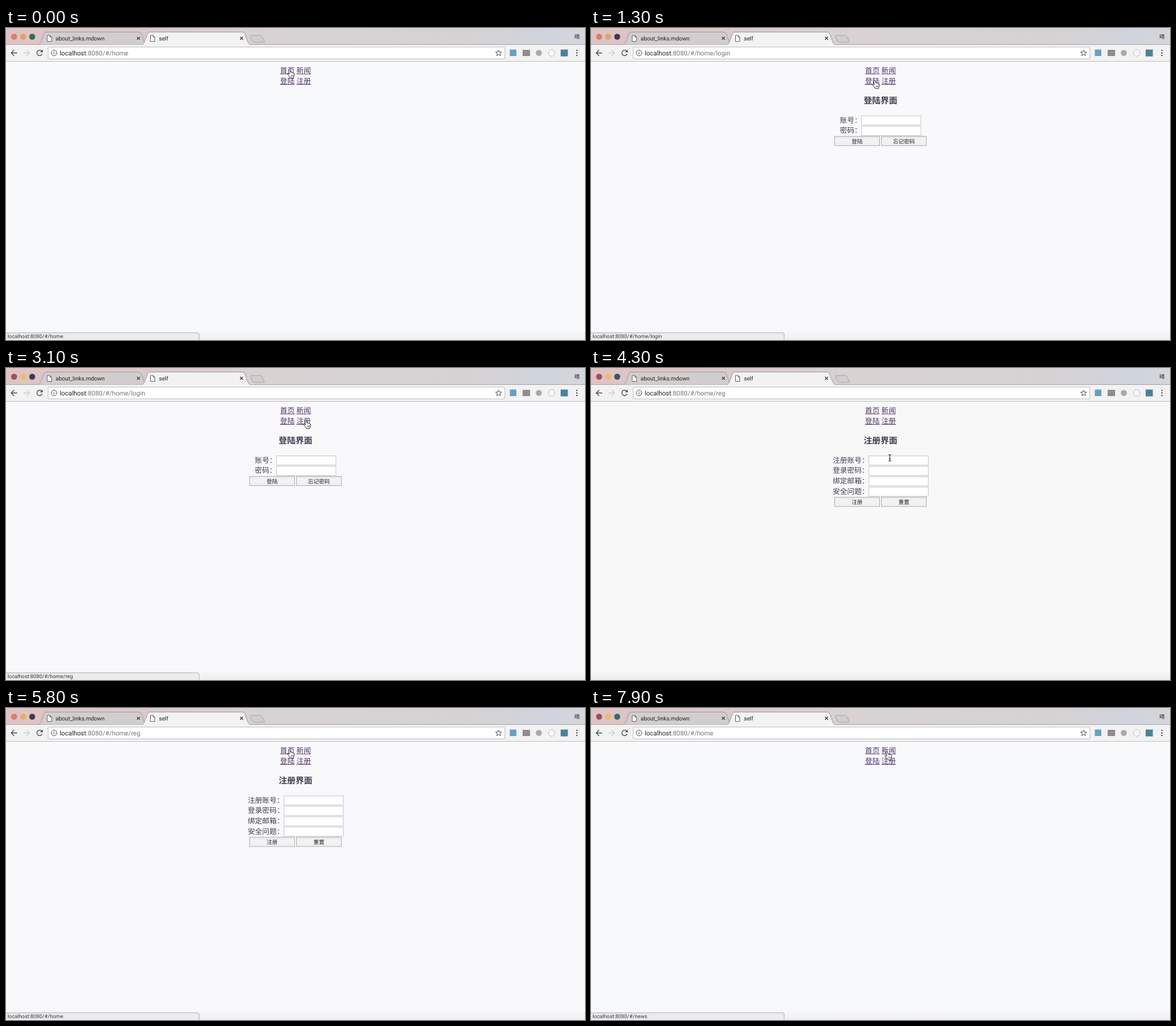
Animation of 928 by 500 pixels, one loop 8 s. Source, as an HTML page:

```html
<!DOCTYPE html>
<html lang="zh-CN">
<head>
<meta charset="utf-8">
<title>self</title>
<style>
html, body { margin: 0; width: 100%; height: 100%; overflow: hidden; }
svg { display: block; width: 100vw; height: 100vh; }
text { font-family: Roboto, "Noto Sans CJK SC", "Noto Sans CJK", sans-serif; text-rendering: geometricPrecision; white-space: pre; }
.cjk text { font-family: "Noto Sans CJK SC", "Noto Sans CJK", sans-serif; fill: #3f404f; }
</style>
</head>
<body>
<svg id="stage" viewBox="0 0 928 500" preserveAspectRatio="none">
  <defs>
    <linearGradient id="strip">
      <stop offset="0" stop-color="#dfc3c4"/><stop offset=".14" stop-color="#dcc6c6"/>
      <stop offset=".45" stop-color="#d8d2d3"/><stop offset=".8" stop-color="#d6d2d4"/>
      <stop offset=".94" stop-color="#cfd4dd"/><stop offset="1" stop-color="#d6d6da"/>
    </linearGradient>
    <linearGradient id="face" x2="0" y2="1">
      <stop offset="0" stop-color="#e9e9ea"/><stop offset=".35" stop-color="#f3f3f4"/><stop offset="1" stop-color="#efeff1"/>
    </linearGradient>
    <linearGradient id="shade" x2="0" y2="1">
      <stop offset="0" stop-color="#888" stop-opacity="0"/><stop offset="1" stop-color="#888" stop-opacity=".1"/>
    </linearGradient>
    <g id="doc" fill="#fafafa" stroke="#5f5c60" stroke-width=".9">
      <path d="M0 0H4.5L7 2.6V9.5H0ZM4.5 0V2.6H7"/>
    </g>
    <path id="cross" d="M-2.3-2.3L2.3 2.3M2.3-2.3L-2.3 2.3" stroke="#48464a" stroke-width="1.3"/>
  </defs>

  <rect id="page" width="928" height="500"/>
  <rect y="484" width="928" height="16" fill="url(#shade)"/>

  <rect width="928" height="27" fill="url(#strip)"/>
  <path d="M0 26.5H928" stroke="#aaa5a8"/>
  <g id="lights"></g>
  <path d="M52 26.5C55 25.5 56 22 58 17L60.5 10Q61.7 6.5 64 6.5H213Q216 6.5 217 10L223 26.5" fill="#d2cdcf" stroke="#a19c9f"/>
  <path d="M218 27C221 25.5 222 22 224 17L226.5 10Q227.7 6.5 230 6.5H379Q382 6.5 383 10L386.500 20Q389 26.500 392 27" fill="#f3f2f3" stroke="#a19c9f"/>
  <path d="M393 12H407Q409 12 410 13.500L414 21.500Q414.500 23 412.500 23H398.500Q396.500 23 395.500 21.500L391.500 13.500Q391 12 393 12Z" fill="#d2cdcf" stroke="#aaa5a8"/>
  <use href="#doc" x="66" y="12"/><use href="#doc" x="231.500" y="12"/>
  <use href="#cross" x="212.300" y="16.500"/><use href="#cross" x="377.500" y="16.500"/>
  <g font-size="9.1" fill="#232225">
    <text x="79.500" y="19.600">about_links.mdown</text>
    <text x="245" y="19.600">self</text>
    <text x="911" y="17.300" font-size="8.500">晴</text>
  </g>

  <rect y="27" width="928" height="26.500" fill="#f3f2f3"/>
  <path d="M0 53.500H928" stroke="#c2c0c3"/>
  <rect x="67.500" y="30.500" width="732" height="19" rx="1.500" fill="#fff" stroke="#c4c2c5"/>
  <g fill="none" stroke="#58565a" stroke-width="1.400">
    <path d="M18 40H8.500M13 35.300L8.300 40L13 44.700"/>
    <path d="M28 40H37.500M33 35.300L37.700 40L33 44.700" stroke="#d2d0d3"/>
    <path d="M57.300 37A4.400 4.400 0 1 0 58 41.500"/>
    <path d="M59 34.500V39H54.500Z" fill="#58565a" stroke="none"/>
    <circle cx="77" cy="40" r="4.500" stroke-width="1"/>
    <path d="M77 39.200V42.500M77 37.200V38.300" stroke-width="1.100"/>
    <path id="star" stroke-width="1"/>
  </g>
  <rect x="807.500" y="34.500" width="10.500" height="10.500" fill="#6a9fc4"/>
  <rect x="828" y="35" width="12" height="10" fill="#918c90"/>
  <circle cx="854" cy="40" r="4.800" fill="#aaa8ab"/>
  <circle cx="874.500" cy="40" r="5.300" fill="#f7f7f8" stroke="#c3c1c4"/>
  <rect x="889" y="34.500" width="11.500" height="11" fill="#4a8199"/>
  <g fill="#58565a"><circle cx="915" cy="36" r="1.150"/><circle cx="915" cy="40" r="1.150"/><circle cx="915" cy="44" r="1.150"/></g>
  <text x="86" y="43.600" font-size="10.450" fill="#232225">localhost<tspan id="path" fill="#77757b"></tspan></text>

  <g id="links" class="cjk"></g>
  <g id="login" class="cjk"></g>
  <g id="reg" class="cjk"></g>

  <g id="status">
    <path d="M-1 488.500H307Q309.500 488.500 309.500 491V501H-1Z" fill="#ececef" stroke="#b6b4b8"/>
    <text id="hint" x="2.500" y="497.300" font-size="8.460" fill="#39373c"></text>
  </g>

  <g id="hand" stroke="#222" stroke-width=".9" stroke-linejoin="round">
    <path fill="#fff" d="M-1.200 .8Q-.9-.5 .3-.2Q1 0 1.300 1L2.300 4.200Q3.300 3.400 4.200 4.400Q5.300 3.800 6 4.900Q7.300 4.600 7.700 6.200L8 9Q7.900 10.500 7 11.400V13H1.600Q.8 11-.8 9.300L-2.800 7Q-3 5.700-1.700 5.900L.2 7.100Z"/>
    <path fill="none" d="M3 8V11M4.700 8V11M6.300 8V10.800" stroke-width=".6"/>
  </g>
  <g id="beam" fill="none">
    <path d="M-2.300-5.300Q0-5.300 0-3.800Q0-5.300 2.300-5.300M0-4V4M-2.300 5.300Q0 5.300 0 3.800Q0 5.300 2.300 5.300M-1.300 1.500H1.300" stroke="#fff" stroke-width="2" opacity=".7"/>
    <path d="M-2.300-5.300Q0-5.300 0-3.800Q0-5.300 2.300-5.300M0-4V4M-2.300 5.300Q0 5.300 0 3.800Q0 5.300 2.300 5.300M-1.300 1.500H1.300" stroke="#222"/>
  </g>
  <path id="arrow" d="M0 0V11.500L2.700 9L4.500 13L6.300 12.200L4.500 8.300H8.200Z" fill="#111" stroke="#fff" stroke-width=".9"/>
</svg>
<script>
const $ = id => document.getElementById(id);
const LOOP = 8000, EM = 11.6;

function add(parent, tag, attrs, label) {
  const el = document.createElementNS("http://www.w3.org/2000/svg", tag);
  for (const k in attrs) el.setAttribute(k, attrs[k]);
  if (label) el.textContent = label;
  parent.append(el);
  return el;
}

const links = [
  { label: "首页", x: 439.3, y: 67.7, url: "/home" },
  { label: "新闻", x: 465.5, y: 67.7, url: "/news" },
  { label: "登陆", x: 439.3, y: 84.4, url: "/home/login" },
  { label: "注册", x: 465.5, y: 84.4, url: "/home/reg" }
];
for (const { label, x, y } of links) {
  add($("links"), "text", { x, y: y + 4.2, "font-size": EM, style: "fill:#51366c" }, label);
  add($("links"), "rect", { x, y: y + 5.6, width: 2 * EM, height: .9, fill: "#51366c" });
}

function form(id, title, labels, left, buttons) {
  const g = $(id), boxX = left + EM * (labels[0].length);
  add(g, "text", { x: 464, y: 121.3, "font-size": 13.57, "font-weight": 700, "text-anchor": "middle" }, title);
  labels.forEach((label, i) => {
    const y = 147.4 + i * 16.7;
    add(g, "text", { x: left, y: y + 4.2, "font-size": EM }, label);
    add(g, "rect", { x: boxX, y: y - 6.6, width: 95.2, height: 14.7, fill: "#fff", stroke: "#cac8cd" });
  });
  const top = 140.3 + labels.length * 16.7;
  buttons.forEach((label, i) => {
    const x = 390.5 + i * 75;
    add(g, "rect", { x, y: top, width: 72, height: 14.8, fill: "url(#face)", stroke: "#b3b1b5" });
    add(g, "text", { x: x + 36, y: top + 10.8, "font-size": 8.8, "text-anchor": "middle", style: "fill:#252428" }, label);
  });
}
form("login", "登陆界面", ["账号：", "密码："], 398.8, ["登陆", "忘记密码"]);
form("reg", "注册界面", ["注册账号：", "登录密码：", "绑定邮箱：", "安全问题："], 387.4, ["注册", "重置"]);

const lights = [13, 27.5, 42].map(cx => add($("lights"), "circle", { cx, cy: 14, r: 4.8 }));
$("star").setAttribute("d", "M" + Array.from({ length: 10 }, (_, i) => {
  const a = i * Math.PI / 5, r = i % 2 ? 2.2 : 5;
  return (789.5 + r * Math.sin(a)).toFixed(2) + " " + (40.3 - r * Math.cos(a)).toFixed(2);
}).join("L") + "Z");

// Pointer stops: time, x, y
const stops = [
  [0, 454, 67], [300, 454, 67], [800, 454, 84], [2100, 454, 84], [2700, 480, 84],
  [3600, 480, 84], [4200, 479, 144], [4600, 479, 144], [5100, 464, 81],
  [5400, 454, 67], [7200, 454, 67], [7800, 474, 70], [8000, 474, 70]
];
// Stepped values: each entry holds from its time on
const routes = [[0, "/home"], [1000, "/home/login"], [3500, "/home/reg"], [6000, "/home"]];
const tints = [[0, "#f8f9fb"], [900, "#f9f8fb"], [3600, "#f9f8f9"], [4500, "#f9f8fb"], [7300, "#f8f9fb"]];
const reds = [[0, "#db7d68"], [1800, "#a04d5e"], [5400, "#db7d68"], [7300, "#a04d5e"]];
const ambers = [[0, "#e2a06c"], [1800, "#efba68"], [5400, "#e8ad68"], [7300, "#efba68"]];
const greens = [[0, "#35695a"], [900, "#3e3c51"], [3600, "#355567"], [4500, "#3e3c51"], [7300, "#356d60"]];

const held = (list, t) => list.filter(e => e[0] <= t).pop()[1];
const show = (id, on) => $(id).setAttribute("visibility", on ? "visible" : "hidden");
const inside = (x, y, l, t, r, b) => x >= l && x <= r && y >= t && y <= b;

function pointer(t) {
  const i = Math.max(1, stops.findIndex(s => s[0] > t));
  const [t0, x0, y0] = stops[i - 1], [t1, x1, y1] = stops[i];
  const p = (t - t0) / (t1 - t0), k = p * p * (3 - 2 * p);
  return [x0 + (x1 - x0) * k, y0 + (y1 - y0) * k];
}

function draw(t) {
  const route = held(routes, t), [x, y] = pointer(t);
  const link = links.find(l => inside(x, y, l.x, l.y - 8, l.x + 2 * EM, l.y + 8));
  const onForm = route !== "/home" &&
    (inside(x, y, 437, 108, 491, 125) || inside(x, y, 388, 140, 541, 206));
  const overText = onForm || inside(x, y, 439, 59, 489, 93);
  const kind = link ? "hand" : overText ? "beam" : "arrow";

  $("path").textContent = ":8080/#" + route;
  show("login", route === "/home/login");
  show("reg", route === "/home/reg");
  show("status", link);
  $("hint").textContent = link ? "localhost:8080/#" + link.url : "";
  for (const id of ["hand", "beam", "arrow"]) show(id, id === kind);
  $(kind).setAttribute("transform", `translate(${x} ${y})`);
  $("page").setAttribute("fill", held(tints, t));
  [reds, ambers, greens].forEach((list, i) => lights[i].setAttribute("fill", held(list, t)));
}

const start = performance.now();
function tick() {
  const t = (performance.now() - start) % LOOP;
  draw(Math.floor(t / 100) * 100);
  requestAnimationFrame(tick);
}
draw(0);
requestAnimationFrame(tick);
</script>
</body>
</html>
```
